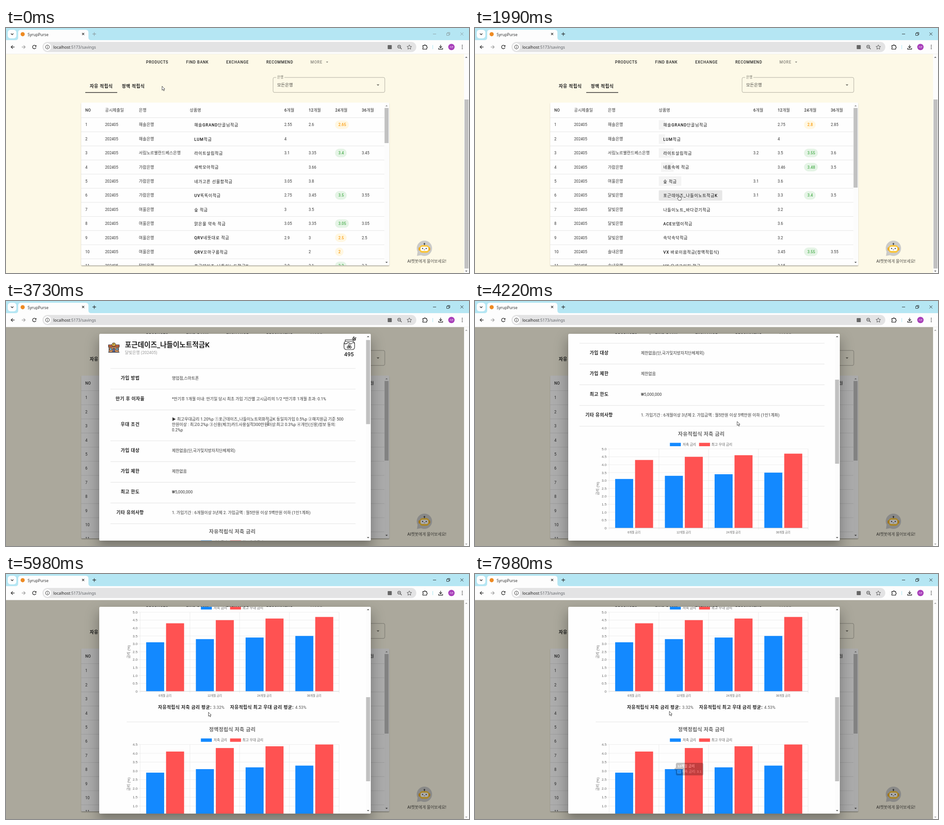
These frames come from a looping animation (1028 by 545 pixels, 8 s). An HTML page:

```html
<!DOCTYPE html>
<html lang="ko">
<head>
<meta charset="utf-8">
<title>Savings</title>
<style>
html, body { margin: 0; width: 100%; height: 100%; overflow: hidden; }
svg { display: block; width: 1028px; height: 545px; }
text { font-family: Roboto, 'Noto Sans CJK KR', 'Noto Sans CJK', sans-serif; white-space: pre; }
.ui text { font-family: 'Noto Sans', 'Noto Sans CJK KR', sans-serif; }
.chart text { font-family: 'Liberation Sans', 'Noto Sans CJK KR', sans-serif; }
</style>
</head>
<body>
<svg id="stage" viewBox="0 0 1028 545"></svg>
<script>
const LOOP = 8000;

// ---- drawing helpers (text is placed by its vertical centre)
const text = (x, cy, size, str, o = '') =>
  `<text x="${x}" y="${(cy + size * .36).toFixed(2)}" font-size="${size}" ${o}>${str}</text>`;
const rect = (x, y, w, h, fill, o = '') =>
  `<rect x="${x}" y="${y}" width="${w}" height="${h}" fill="${fill}" ${o}/>`;
const circle = (x, y, r, fill, o = '') => `<circle cx="${x}" cy="${y}" r="${r}" fill="${fill}" ${o}/>`;
const path = (d, fill, o = '') => `<path d="${d}" fill="${fill}" ${o}/>`;
const line = (d, color, w = 1, o = '') => path(d, 'none', `stroke="${color}" stroke-width="${w}" ${o}`);
const group = (id, body, o = '') => `<g id="${id}" ${o}>${body}</g>`;
const clip = (id, x, y, w, h) => `<clipPath id="${id}">${rect(x, y, w, h, '#000')}</clipPath>`;
const caret = (x, y, r, color, up = 1) =>
  path(`M${x - r} ${y + up * r / 2}h${2 * r}L${x} ${y - up * r / 2}Z`, color);
const spaced = n => `letter-spacing="${n}"`;
const BOLD = 'font-weight="700"', MED = 'font-weight="500"', MID = 'text-anchor="middle"';

// ---- browser frame
function browser() {
  const dark = '#2b2b2b';
  return `<g class="ui">` +
    rect(0, 0, 1028, 28, '#b5e6f3') +
    rect(4, 4, 19, 19, '#fdfeff', 'rx="6"') +
    line('M11 12.3l2.7 2.7 2.7-2.7', dark, 1.3) +
    path('M21 27q6 0 6-6v-11q0-6 6-6h144q6 0 6 6v11q0 6 6 6z', '#fdfdfd') +
    circle(37, 13.8, 4.6, '#ee8a22') +
    text(48, 14.4, 8.6, 'SyrupPurse', 'fill="#333"') +
    line('M169 11l4.6 4.6M173.6 11l-4.6 4.6', dark, 1.1) +
    group('controls', line('M192 13.4h8M196 9.4v8', 'currentColor', 1.1) +
      line('M948 13.4h7M978.500 11.500h5v5h-5zM980.500 11.500v-1.500h5v5h-1.500M1009 10l6.500 6.500M1015.500 10l-6.500 6.500',
        'currentColor', .9)) +
    rect(0, 27, 1028, 31, '#fdfdfd') +
    line('M0 57.800h1028', '#e4e4e0', .6) +
    line('M19 42.300h-7.500M15 38.600l-3.700 3.700 3.700 3.700', dark, 1.3) +
    line('M35 42.300h7.500M39 38.600l3.700 3.700-3.700 3.700', '#999', 1.2) +
    line('M66.300 40.300a3.900 3.900 0 1 0 .4 3', dark, 1.3) + path('M67.500 37.800v3.700h-3.700z', dark) +
    rect(81, 31, 830, 22.500, '#e3e3e4', 'rx="11.2"') +
    circle(92, 42.300, 8.400, '#fff') +
    circle(92, 42.300, 4.300, 'none', `stroke="${dark}"`) + line('M92 41.700v2.800M92 39.800v1', dark, 1.1) +
    text(105, 42.600, 8.900, 'localhost<tspan fill="#5f6368">:5173/savings</tspan>', 'fill="#222"') +
    rect(847.500, 38, 9, 9, '#666', 'rx="1"') +
    circle(873, 41.400, 3.200, 'none', `stroke="#444" stroke-width="1.1"`) +
    line('M875.500 44l3 3M871.500 41.400h3', '#444', 1.100) +
    path('M895.500 37.500l1.500 3.300 3.600.4-2.700 2.400.8 3.500-3.200-1.800-3.200 1.800.8-3.500-2.700-2.400 3.600-.4z',
      'none', 'stroke="#444" stroke-width=".9"') +
    path('M925.500 39h3a1.500 1.500 0 0 1 3 0h2.500v2.700a1.500 1.500 0 0 1 0 3v2.500h-8.500v-2.700a1.400 1.400 0 0 0 0-2.700z',
      'none', `stroke="${dark}" stroke-width="1.3"`) +
    line('M947.500 38v9', '#b5e6f3', 1.200) +
    line('M965 37.500v6M962 41l3 3 3-3M960.500 44.500v2.500h9v-2.500', dark, 1.300) +
    circle(989, 42.300, 7, '#a63bb8') + text(989, 42.300, 5, '가온', `fill="#fff" ${MID}`) +
    [38.500, 42.300, 46.100].map(y => circle(1013, y, 1, dark)).join('') + '</g>';
}

// ---- savings table: bank, product, 6 / 12 / 24 / 36 month rates
const H = '해솔은행', S = '서림노르웰란드베스은행', G = '가람은행', Y = '여울은행', D = '달빛은행', N = '솔내은행';
const PICK = '포근데이즈_나들이노트적금K';
const FREE = [
  [H, '해솔GRAND단골님적금', '2.55 2.6 2.65'], [H, 'LUM적금', '4'],
  [S, '라이트살림적금', '3.1 3.35 3.4 3.45'], [G, '새싹모아적금', '- 3.66'],
  [G, '네가고른 선물함적금', '3.05 3.8'], [G, 'UV똑똑이적금', '2.75 3.45 3.5 3.55'],
  [Y, '숲 적금', '3 3.5'], [Y, '맑은물 약속 적금', '3.05 3.35 3.05 3.05'],
  [Y, 'QRV네뜻대로 적금', '2.9 3 2.5 2.5'], [Y, 'QRV꼬마구름적금', '- 2 2'],
  [D, PICK, '2.9 3.1 3.2 3.3']];
const FIXED = [
  [H, '해솔GRAND단골님적금', '- 2.75 2.8 2.85'], [H, 'LUM적금', '- 4'],
  [S, '라이트살림적금', '3.2 3.5 3.55 3.6'], [G, '네품속에 적금', '- 3.46 3.48 3.5'],
  [Y, '숲 적금', '3.1 3.6'], [D, PICK, '3.1 3.3 3.4 3.5'],
  [D, '나들이노트_바다걷기적금', '- 3.2'], [D, 'ACE보탬이적금', '- 3.6'],
  [D, '속닥속닥적금', '- 3.2'], [N, 'VX 바로이음적금(정액적립식)', '- 3.45 3.55 3.55'],
  [N, 'VX 온새로이지 적금', '- 3.15']];
const COLS = [618, 672, 731, 790];

function rate(v, i, y) {
  if (v === '-') return '';
  if (i !== 2) return text(COLS[i], y, 8.6, v);
  const [bg, fg] = v >= 3 ? ['#e5f4e6', '#4caf50'] : ['#fff7e2', '#fb9b0c'];
  const w = 14 + (v.length > 1 ? v.length * 4.83 - 2.5 : 5);
  return rect(730.5, y - 9.5, w, 19, bg, 'rx="9.5"') + text(738, y, 8.6, v, `fill="${fg}" ${MED}`);
}

const rows = list => list.map(([bank, name, rates], i) => {
  const y = 215.2 + 31.4 * i;
  return text(176, y, 8.6, i + 1) + text(220, y, 8.6, '202405') + text(295, y, 9, bank, spaced(.17)) +
    text(418, y + .8, 9, name, `${MED} fill="#111" ${spaced(.84)}`) +
    rates.split(' ').map((v, c) => rate(v, c, y)).join('');
}).join('');

function table() {
  const head = [[176, 'NO'], [220, '공시제출일'], [295, '은행'], [408, '상품명'],
    [618, '6개월'], [672, '12개월'], [731, '24개월'], [790, '36개월']];
  const trails = [[408, 205, 14], [408, 236.5, 14], [408, 267.5, 33], [413, 299, 28], [408, 330, 50]];
  let lines = '';
  for (let i = 0; i < 11; i++) lines += `M167 ${(199.5 + 31.4 * i).toFixed(1)}h673.500`;
  return rect(167.5, 168, 683, 361.5, '#000', 'opacity=".35" style="filter:blur(1.2px)"') +
    rect(167, 166, 684, 362, '#fefefe', 'rx="2"') +
    `<g clip-path="url(#card)" fill="#333">` +
    head.map(([x, s]) => text(x, 183, x === 176 ? 8.6 : 9, s, `${MED} ${spaced(.12)}`)).join('') +
    line(lines, '#e2e2e2', .9) +
    trails.map(([x, y, w], i) => rect(x, y, w, 21, '#f4f4f4', `id="trail${i}"`)).join('') +
    rect(408, 361, 141, 23, '#000', 'id="hover" rx="2"') +
    group('free', rows(FREE)) + group('fixed', rows(FIXED)) + '</g>' +
    rect(840, 167, 10.500, 360, '#fcfcfc') + caret(845, 173, 2.600, '#888') + caret(845, 521.500, 2.600, '#444', -1) +
    rect(840.5, 178, 9, 78, '#c1c1c1', 'id="tableThumb"');
}

// ---- page behind the dialog
function page() {
  const nav = [[311, 'PRODUCTS'], [400, 'FIND BANK'], [489, 'EXCHANGE'], [578, 'RECOMMEND'], [676, 'MORE']];
  const tab = `${BOLD} fill="#1c1c1c" ${spaced(.6)}`;
  return rect(0, 58, 1017, 487, '#fdf9e7') +
    nav.map(([x, s]) => text(x, 76, 8.6, s, `${MED} fill="${x === 676 ? '#85837a' : '#222'}" ${spaced(.7)}`)).join('') +
    caret(713, 76, 2.4, '#77756c', -1) +
    text(186, 129.5, 9.8, '자유 적립식', tab) + text(257, 129.5, 9.8, '정액 적립식', tab) +
    rect(176, 142.8, 71, 1.4, '#222', 'id="underline"') +
    rect(593, 110, 248, 33.3, 'none', 'rx="3" stroke="#a5a397" stroke-width=".9"') +
    rect(600, 108, 18, 4, '#fdf9e7') +
    text(602, 109.5, 7.6, '은행', 'fill="#77756c"') +
    text(602, 127, 9.5, '모든은행', 'fill="#4d4b45"') + caret(826, 127, 3, '#6b695f', -1) +
    table() + robot() +
    text(891, 519, 8.9, 'AI챗봇에게 물어보세요!', `fill="#55534d" ${MED}`);
}

function robot() {
  return path('M914 497l-1.500 10 11-2z', '#c9c9c6') + circle(929, 490, 17, '#cbcbc9') +
    line('M929 478.500v5', '#444', 1.500) + circle(929, 480, 1.700, '#444') +
    rect(916, 487.500, 26, 8, '#e9a520', 'rx="3"') +
    rect(918.500, 483, 21, 17, '#f9c53c', 'rx="6"') +
    rect(920.500, 486.500, 17, 9.500, '#fff', 'rx="4"') +
    circle(925, 490.500, 1.300, '#333') + circle(933, 490.500, 1.300, '#333') +
    line('M927.500 493q1.500 1.200 3 0', '#333', .8);
}

// ---- dialog
function chart(top, title, max, base, best) {
  const unit = 176 / max;
  let grid = '', labels = '', bars = '';
  for (let v = 0; v <= max; v += .5) {
    const y = top + 176 - v * unit;
    grid += `M294 ${y}h446`;
    labels += text(292, y, 7.8, v ? v.toFixed(1) : 0, 'text-anchor="end"');
  }
  for (let i = 0; i < 5; i++) grid += `M${298 + 110.4 * i} ${top}v180`;
  const bar = (x, v, fill, o) => rect(x, top + 176 - v * unit, 40, v * unit, fill, o);
  base.forEach((v, i) => {
    bars += bar(311.2 + 110.4 * i, v, '#1389ff') + bar(355.4 + 110.4 * i, best[i], '#ff5252');
    labels += text(353 + 110.4 * i, top + 186, 6.3, `${6 + 6 * i + (i > 1 ? 6 * (i - 1) : 0)}개월 금리`, MID);
  });
  if (max === 5) bars += bar(421.6, base[1], '#007aff', 'id="lit"');
  return `<g class="chart" fill="#666">` +
    text(502.5, top - 33.5, 11.3, title, `${BOLD} ${MID} ${spaced(.35)}`) +
    rect(432.7, top - 13.500, 24.300, 7.500, '#1389ff') + text(461, top - 10.2, 7.6, '저축 금리') +
    rect(497.5, top - 13.500, 24.300, 7.500, '#ff5252') + text(525, top - 10.2, 7.6, '최고 우대 금리') +
    line(grid, '#e5e5e5', .7) + bars + line(`M298 ${top + 176}h442`, '#ccc', .7) + labels +
    `<g transform="translate(272 ${top + 88}) rotate(-90)">${text(0, 0, 8, '금리 (%)', MID)}</g></g>`;
}

function tooltip(id, tipY, rate) {
  return group(id, path(`M442 ${tipY}l4-3.500v-7q0-3.500 3.500-3.500h54q3.500 0 3.500 3.500v21q0 3.500-3.500 3.500h-54q-3.500 0-3.500-3.500v-7z`,
    '#000', 'opacity=".8"') +
    text(449.5, tipY - 6.7, 7.5, '12개월 금리', BOLD) +
    rect(449.7, tipY + 2.2, 7, 7, '#1389ff', 'stroke="#fff" stroke-width=".8"') +
    text(458.7, tipY + 5.7, 7.5, `저축 금리: ${rate}`), 'class="chart" fill="#fff"');
}

function bankIcon() {
  const ink = 'stroke="#2a2a33" stroke-width="1"';
  return rect(228.5, 102, 21.500, 11.500, '#e9a061', ink) +
    rect(227.5, 97.5, 24, 5, '#c9643a', ink) + circle(239.3, 97, 4, '#f8c94a', ink) +
    text(239.3, 97, 5, '$', `${MID} ${BOLD} fill="#333"`) +
    [230.5, 244.500].map(x => rect(x, 105, 4, 4.500, '#8fd0e8', ink)).join('') +
    rect(237, 105.500, 4.800, 8, '#5c6fa3', ink) + line('M227 114h25', '#2a2a33', 1.200);
}

function jarIcon() {
  return `<g fill="none" stroke="#222" stroke-width="1.2">` +
    '<rect x="753" y="86" width="18" height="3.5" rx="1.7"/>' +
    '<path d="M754 89.500q-3.500 2-3.500 6v7q0 5.500 5.500 5.500h12.500q5.500 0 5.500-5.500v-7q0-4-3.500-6M751 94q3 3 6 0t6 0 5 0 5.500 0"/>' +
    '<circle cx="762" cy="99" r="2"/><circle cx="759.500" cy="102.800" r="2"/><circle cx="764.500" cy="102.800" r="2"/>' +
    '<ellipse cx="773" cy="84.500" rx="3.600" ry="2.200" transform="rotate(35 773 84.500)"/>' +
    '<path d="M771.500 86l2-3.500M773.500 87l2-3M772.500 82q-2-3 1-2.500M775 83q2-3 2.500-.5"/></g>';
}

function dialog() {
  const info = [
    [171, '가입 방법', ['영업점,스마트폰']],
    [217.3, '만기 후 이자율', ['*만기후 1개월 이내: 만기일 당시 최초 가입 기간별 고시금리의 1/2 *만기후 1개월 초과: 0.1%']],
    [274.5, '우대 조건', [
      '▶\uFE0E 최고우대금리 1.20%p ①포근데이즈_나들이노트외화적금K 동일자가입 0.5%p ②해지원금 기준 500',
      '만원이상 : 최고0.2%p ③신용(체크)카드사용실적300만원이상:최고 0.3%p ④개인(신용)정보 동의:',
      '0.2%p']],
    [332, '가입 대상', ['제한없음(단,국가및지방자치단체제외)']],
    [378.3, '가입 제한', ['제한없음']],
    [424.6, '최고 한도', ['₩5,000,000']],
    [470.6, '기타 유의사항', ['1. 가입기간 : 6개월이상 3년제 2. 가입금액 : 월5만원 이상 5백만원 이하 (1인1계좌)']]];
  const strong = `${BOLD} fill="#222" ${spaced(.5)}`;
  const shadow = (x, y, w, h, blur, a) => rect(x, y, w, h, '#000', `opacity="${a}" style="filter:blur(${blur}px)"`);
  const body = group('icons', bankIcon() + jarIcon()) +
    text(264, 97.5, 15.5, PICK, `${BOLD} fill="#222"`) +
    text(264, 114.3, 9, `${D} (202405)`, 'fill="#999"') +
    text(761.5, 118, 12.5, '495', `${MED} fill="#222" ${MID}`) +
    line([150, 196, 242.3, 311, 357.2, 403.3, 449.3, 495.5].map(y => `M232 ${y}h544`).join(''), '#e0e0e0', .9) +
    info.map(([y, label, lines]) => text(275.7, y, 10, label, `${strong} ${MID}`) +
      lines.map((s, i) => text(368.5, y + .6 + (i - (lines.length - 1) / 2) * 12, 8.9, s, `fill="#333" ${spaced(.1)}`)).join('')).join('') +
    chart(546, '자유적립식 저축 금리', 5, [3.1, 3.3, 3.4, 3.5], [4.3, 4.5, 4.6, 4.7]) +
    text(337.5, 757.3, 10, '자유적립식 저축 금리 평균:', strong) + text(460, 757.8, 9.3, '3.32%', 'fill="#555"') +
    text(497.5, 757.3, 10, '자유적립식 최고 우대 금리 평균:', strong) + text(642, 757.8, 9.3, '4.53%', 'fill="#555"') +
    line('M268 790h472', '#e0e0e0', .9) +
    chart(840.3, '정액정립식 저축 금리', 4.5, [2.9, 3.1, 3.2, 3.3], [4.1, 4.3, 4.4, 4.5]) +
    tooltip('tipUp', 606, 3.3) + tooltip('tipDown', 895, 3.1);
  return group('dialog',
    shadow(200, 80, 617, 470, 15, .12) + shadow(205, 89, 607, 464, 12, .14) + shadow(212, 80, 593, 452, 5, .2) +
    rect(207, 73, 603, 460, '#fefefe', 'rx="2.5"') +
    `<g clip-path="url(#sheet)">${group('scroll', body)}</g>` +
    rect(799, 74, 10.5, 458, '#fcfcfc') + caret(804, 79, 2.6, '#444') + caret(804, 526.5, 2.6, '#444', -1) +
    rect(799.5, 83.6, 9, 187, '#c1c1c1', 'id="thumb"'));
}

function cursors() {
  const ink = 'stroke="#222" stroke-width=".8" stroke-linejoin="round"';
  return group('cursor',
    group('arrow', path('M0 0v8.800l2-1.800 1.600 3.300 1.500-.7-1.500-3.200h2.700z', '#fff', ink)) +
    group('hand', path('M-.9 6.500v-5.600q.9-1.500 1.800 0v3.400l3.600.6q1.400.3 1.200 1.700l-.6 3.200-.8 2h-4.600l-2.600-4q-.6-1.300.6-1.500z', '#fff', ink)) +
    group('beam', line('M-1.500 0h3M0 0v8.500M-1.500 8.500h3', '#222', .8)));
}

document.getElementById('stage').innerHTML =
  `<defs>${clip('card', 167, 166, 684, 362)}${clip('sheet', 207, 73, 592, 460)}</defs>` +
  page() + rect(0, 58, 1017, 487, '#000', 'id="shade"') +
  rect(1017, 58, 11, 487, '#fcfcfc') +
  group('pageBar', caret(1022, 65, 2.6, 'currentColor') + caret(1022, 541, 2.6, 'currentColor', -1)) +
  rect(1018, 159, 9, 376, '#c1c1c1', 'id="pageThumb"') +
  dialog() + browser() + cursors();

// ---- motion, in ticks of roughly 98 ms
const CLOCK = [[0, 0], [1990, 20], [3730, 38], [5980, 61], [7980, 81], [8180, 83]];
const SCROLL = [[37, 0], [38, 8], [39, 75], [40, 110], [41, 117], [42, 180], [43, 225], [44, 235],
  [45, 300], [46, 340], [47, 352], [53, 353], [54, 420], [55, 469]];
const POINTER = [[3, 346.5, 129.5, 'arrow'], [4, 338, 126.5, 'arrow'], [6, 292, 133, 'hand'], [7, 279, 135, 'hand'],
  [11, 279, 135, 'arrow'], [13, 385, 205, 'arrow'], [14, 414, 232, 'hand'], [16, 430, 300, 'hand'],
  [18, 452.5, 371.5, 'hand'], [24, 452.5, 371.5, 'hand'], [25, 449.5, 371.5, 'arrow'], [27, 449.5, 371.5, 'arrow'],
  [30, 568, 286, 'arrow'], [31, 581.5, 265.5, 'arrow'], [33, 582, 268, 'beam'], [40, 582, 268, 'arrow'],
  [47, 582, 268, 'arrow'], [52, 430, 376.5, 'arrow'], [54, 430, 376.5, 'arrow'], [55, 433, 371, 'arrow'],
  [59, 450, 306.5, 'arrow'], [60, 450, 306.5, 'arrow'], [61, 449.5, 307.5, 'arrow'], [62, 447, 328, 'arrow'],
  [63, 440, 300, 'arrow'], [65, 437, 245, 'arrow'], [69, 437, 245, 'arrow'], [74, 437, 453, 'arrow'],
  [78, 437, 453, 'arrow'], [81, 431.5, 305.5, 'arrow']];

function track(k, keys, col = 1) {
  let i = keys.findIndex(p => p[0] > k);
  if (i === 0) return keys[0][col];
  if (i < 0) return keys[keys.length - 1][col];
  const a = keys[i - 1], b = keys[i];
  return typeof a[col] === 'string' ? a[col] : a[col] + (b[col] - a[col]) * (k - a[0]) / (b[0] - a[0]);
}

const el = {};
document.querySelectorAll('#stage [id]').forEach(n => el[n.id] = n);
const set = (id, name, value) => el[id].setAttribute(name, value);
const fade = (id, value) => set(id, 'opacity', value);

function draw(t) {
  const k = Math.floor(track(t, CLOCK) + .15);
  const clicked = k >= 10, swapped = k >= 11, opened = k >= 25;

  set('controls', 'color', clicked ? '#222' : '#8a9a9e');
  set('underline', 'x', 176 + track(k, [[9, 0], [10, 25], [11, 60], [12, 71]]));
  fade('free', swapped ? 0 : 1);
  fade('fixed', swapped ? 1 : 0);
  set('tableThumb', 'height', swapped ? 177 : 78);
  for (let i = 0; i < 5; i++) fade('trail' + i, k >= 14 + Math.floor(i * .8) ? 1 : 0);
  fade('hover', track(k, [[18, 0], [20, .09], [21, .09], [22, .15]]));

  fade('shade', track(k, [[24, 0], [25, .08], [26, .22], [27, .325]]));
  fade('pageThumb', opened ? 0 : 1);
  set('pageBar', 'color', opened ? '#999' : '#555');

  const open = track(k, [[24, 0], [25, .45], [26, .89], [27, 1]]);
  const size = .9 + .1 * open;
  set('dialog', 'transform', `translate(508.5 302.5) scale(${size}) translate(-508.5 -302.5)`);
  fade('dialog', track(k, [[24, 0], [25, .45], [26, .94], [27, 1]]));
  fade('icons', track(k, [[25, 0], [26, .04], [30, 1]]));

  const y = track(k, SCROLL);
  set('scroll', 'transform', `translate(0 ${8 - y})`);
  set('thumb', 'y', 83.6 + y * .406);
  fade('lit', k >= 50 && k < 55 ? 1 : 0);
  fade('tipUp', track(k, [[49, 0], [52, 1], [55, 1], [59, 0], [63, 0], [65, 1], [70, 1], [73, 0]]));
  fade('tipDown', track(k, [[71, 0], [74, 1], [79, 1], [80, .7], [81, .3]]));

  set('cursor', 'transform', `translate(${track(k, POINTER)} ${track(k, POINTER, 2)})`);
  const shape = track(k, POINTER, 3);
  ['arrow', 'hand', 'beam'].forEach(id => fade(id, id === shape ? 1 : 0));
}

function loop() {
  draw(performance.now() % LOOP);
  requestAnimationFrame(loop);
}
loop();
</script>
</body>
</html>
```
